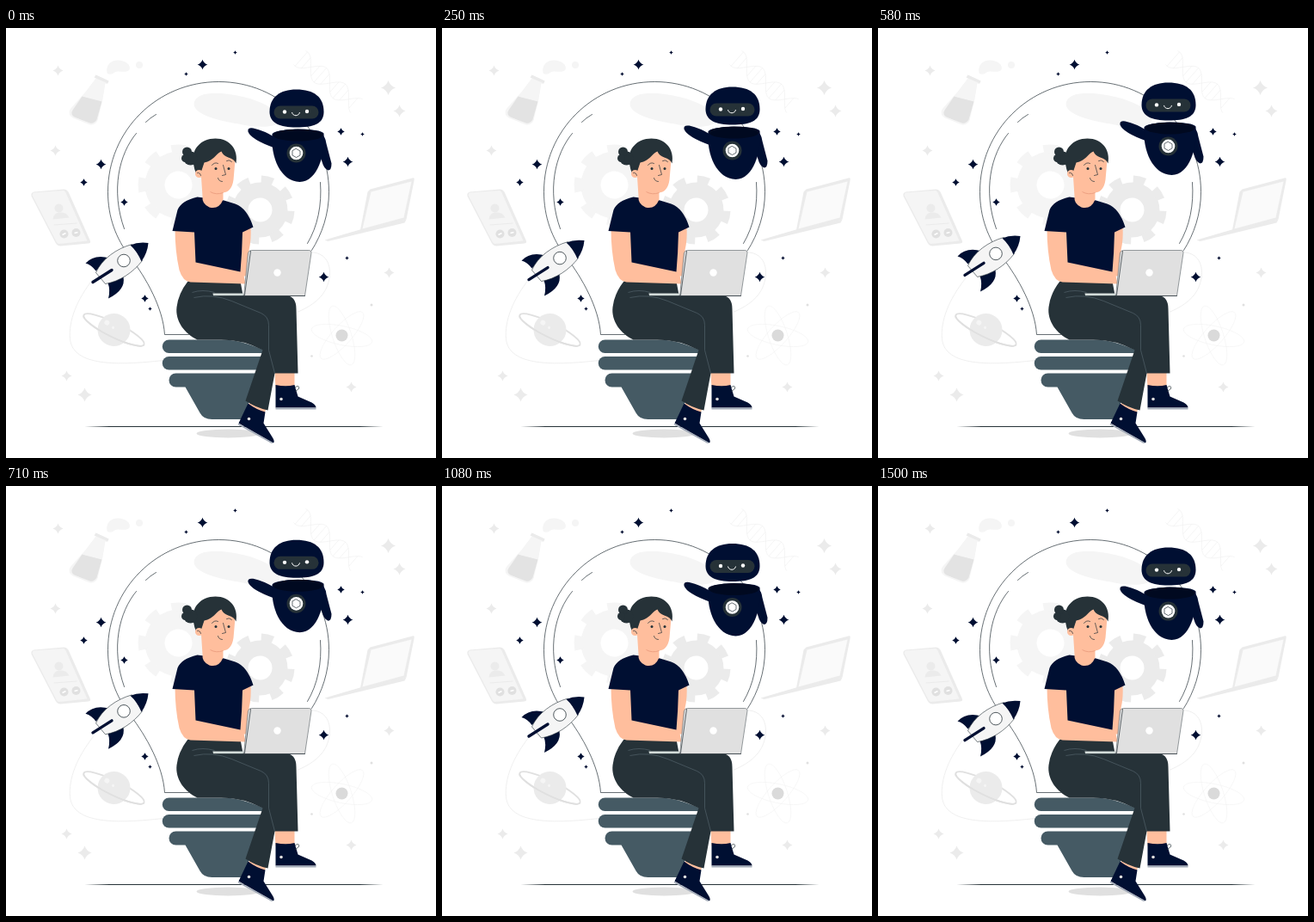
Animation, 500 px wide and 500 px high, one loop 1540 ms. Source, as an HTML page:

```html
<!DOCTYPE html>
<html lang="en">
<head>
<meta charset="utf-8">
<title>Big idea</title>
<style>
  html, body { margin: 0; width: 100%; height: 100%; overflow: hidden; background: #fff; }
  svg { display: block; width: 100vw; height: 100vh; }
  .navy { fill: #000f32; }
  .dark { fill: #263238; }
  .skin { fill: #ffbe9d; }
  .slate { fill: #455a64; }
  .g0 { fill: #fafafa; }
  .g1 { fill: #f5f5f5; }
  .g2 { fill: #ebebeb; }
  .g3 { fill: #e0e0e0; }
  .white { fill: #fff; }
  .line { fill: none; stroke: #263238; stroke-width: .7; stroke-linecap: round; }
  .faint { fill: none; stroke: #ebebeb; stroke-width: .8; }
  .ring { fill: none; stroke: #e0e0e0; stroke-width: 1.8; }
</style>
</head>
<body>
<svg viewBox="-.5 -.5 500 500">
  <g id="gears"></g>
  <g id="sparkles"></g>

  <!-- flask -->
  <path class="g1" d="M104 54 L119 61 L117 65 L115 64 L112 82 L106 107 Q103 113 97 112 L77 104 Q71 100 74 94 L91 75 L104 58Z"/>
  <path d="M88 79 L111 85 L105 106 Q102 111 97 110 L79 103 Q74 100 77 95Z" fill="#e3e3e3"/>
  <path class="g2" d="M104 54 L119 61 L118 64 L102 57Z"/>
  <path class="g1" d="M117 52 C115 41 123 36 131 37 C139 38 145 42 143 48 C138 53 131 48 126 51 Q121 55 117 52Z"/>
  <circle class="g1" cx="154.500" cy="42.500" r="4"/>

  <path id="dna" class="faint" stroke-opacity=".65"/>

  <!-- phone -->
  <path class="g2" d="M32 190 L67 187 Q70 187 72 190 L97 246 Q99 250 95 250 L63 253 Q59 253 57 249 L29 195 Q28 191 32 190Z"/>
  <path class="g1" d="M31 191 L66 188.500 Q68 188 69 191 L94 247 L61 250.500 Q59 250 58 248 L30 194Z"/>
  <g class="g2">
    <circle cx="61" cy="209" r="5"/>
    <path d="M54 222 Q55 214 62 214 Q70 213 73 220Z"/>
    <path d="M55 228 L82 226 L82.500 227 L55.500 229Z"/>
  </g>
  <g class="g3"><circle cx="67" cy="239" r="5"/><circle cx="81" cy="237.500" r="5"/></g>
  <path d="M65 240 L69 238 M79 238 L83 237" stroke="#fff" stroke-width="1.500"/>

  <!-- pale laptop -->
  <path class="g2" d="M423 187 L472 174 Q475 173 474 177 L465 222 L411 237 L420 190Z"/>
  <path class="g0" d="M424 190 L471 178 L462 220 L414 233Z"/>
  <path class="g2" d="M370 246 L411 234 L465 222 L463 226 L374 247.500Z"/>

  <!-- planet -->
  <g transform="translate(125 350.500) rotate(26)">
    <ellipse class="ring" rx="39" ry="8.500"/>
    <circle class="g2" r="19"/>
    <circle class="g1" cx="-11" cy="-4" r="3"/><circle class="g1" cx="-2" cy="-2" r="1.500"/>
    <path class="ring" d="M-39 0 A39 8.500 0 0 0 39 0"/>
  </g>

  <!-- atom -->
  <g class="faint" stroke-opacity=".45">
    <ellipse cx="390" cy="357" rx="36" ry="11" transform="rotate(12 390 357)"/>
    <ellipse cx="390" cy="357" rx="36" ry="11" transform="rotate(72 390 357)"/>
    <ellipse cx="390" cy="357" rx="36" ry="11" transform="rotate(132 390 357)"/>
  </g>
  <circle cx="390" cy="357" r="7" fill="#dadada"/>
  <circle class="g3" cx="424.500" cy="321.500" r="1.500"/><circle class="g3" cx="355" cy="381" r="1.300"/>

  <path class="faint" d="M101 291 C82 315 72 340 74 361 C77 393 130 392 182 386 M345 261 C378 255 381 285 371 304 C364 317 350 325 338 330"/>

  <!-- bulb -->
  <path class="g1" d="M218 87 C220 75 240 73 262 77 C295 82 317 95 318 106 C318 116 292 116 270 111 C243 107 217 99 218 87Z"/>
  <path class="line" d="M212 356 H184 C182 325 163 291 144 266 C127 244 118 219 118 190 C118 119 175 62 247 62 C318 62 375 119 375 190 C375 216 367 239 355 258"/>
  <path class="line" d="M151 122 C131 146 121 188 137 233 M162 109 Q167 104 174 100 M365 179 C367 205 362 230 350 250"/>

  <path d="M91 463 L120 462.600 H410 L438 463 L410 463.400 H120Z" fill="#263238"/>
  <ellipse class="g3" cx="258" cy="471" rx="37" ry="5"/>
  <g class="slate">
    <path d="M189 362 H250 Q270 361 299 374 V377.500 H189 A7.700 7.700 0 0 1 189 362Z"/>
    <path d="M189 381.500 H298 L294 397 H189 A7.700 7.700 0 0 1 189 381.500Z"/>
    <path d="M197 401 H293 L288 417 L275 454.500 H239 Q229 454.500 225 447 L208 417 H197 A8 8 0 0 1 197 401Z"/>
  </g>

  <!-- feet -->
  <path class="skin" d="M312 400 H335 V418 H313Z M284 430 L303 440 L299 450 L281 440Z"/>
  <path class="navy" d="M313 414.500 Q325 417 335 414.500 L339 428 L355 435 Q360 438 360 441 H313Z"/>
  <path class="navy" d="M281 436 Q290 443 301 446 L299 459 L309 475 Q313 481 310 482 L270 459Z"/>
  <path d="M313 442 H360 M269.500 460 L309 482" stroke="#a3abb8" stroke-width="1.800"/>
  <path class="line" d="M336 417 Q341 414 340 419 L336 422"/>
  <circle class="g3" cx="319.500" cy="431" r="1.800"/><circle class="g3" cx="282" cy="454" r="1.800"/>

  <!-- legs -->
  <path class="dark" d="M211 294 H272 L275 310 H324 Q337 311 337 326 L339 401 H312 L304 444 Q290 441 278 433 L298 374 Q275 362 250 362 H222 C207 355 196 340 198 324 Q200 308 211 294Z"/>
  <path d="M216 307 Q228 303 242 307 M218 313 Q240 308 262 317 L296 331 Q305 335 305 345 V374 L312 401" fill="none" stroke="#52626a" stroke-width=".7"/>

  <!-- torso and arms -->
  <path class="skin" d="M196 232 L219 235 L221 272 L275 282 L278 297 L214 295 Q205 294 201 281 Q196 259 196 232Z"/>
  <path class="skin" d="M273 233 L284 231 Q285 245 282 258 L285 264 L279 288 H271Z"/>
  <path class="navy" d="M222 196 C209 199 202 204 199 211 L193 235.500 L218.500 237 L220 272 L272 283 Q274 260 274.500 237 L287 231 Q280 209 266 204 L253 200Z"/>

  <!-- head -->
  <path class="skin" d="M226 165 L228 195 Q227 204 236 208 Q247 211 252 199 L252 191 Q262 190 264 176 L266 153 L251 139 L230 149Z"/>
  <path class="dark" d="M218 160 C213 141 226 128 243 128 C260 128 270 141 267 157 Q265 152 258 150 Q252 148 250 143 C243 146 241 154 230 156 L227 165 L223 172 Q219 167 218 160Z"/>
  <circle class="dark" cx="214" cy="151" r="8"/>
  <circle class="dark" cx="210" cy="143.500" r="5.500"/><circle class="dark" cx="208" cy="151" r="4.500"/>
  <circle class="skin" cx="224" cy="169" r="4.500"/>
  <path class="line" d="M222 168 Q225 167 226 171"/>
  <g class="dark"><circle cx="243.500" cy="163" r="1.500"/><circle cx="258.500" cy="163" r="1.500"/></g>
  <path class="line" d="M239 159 Q242 155 246 157 M256 154 Q259 152 262 155"/>
  <path class="line" d="M252 159 L255 170 L251 171 M246 174 Q247 178 251 178"/>
  <path d="M237 190 Q244 194 252 191" fill="none" stroke="#e99a7c" stroke-width=".8"/>

  <!-- laptop -->
  <path class="g3" d="M285 258 H352 Q355 258 354.500 261 L347 311 H276 L281 261 Q282 258 285 258Z" stroke="#6b7276" stroke-width=".7"/>
  <path class="line" d="M284 259 L277 310"/>
  <circle class="white" cx="315" cy="284" r="4.200"/>
  <path d="M240 308 H276 L275 311 H242 Q240 311 240 308Z" fill="#d3dcd9"/>
  <path class="line" d="M242 311 H347"/>

  <g id="floaters">
    <!-- rocket -->
    <path class="navy" d="M92 273 Q102 262 120 267 L104 282 Q99 275 92 273Z M118 296 L136 289 Q139 304 118.500 314 Q121 304 118 296Z"/>
    <path class="g1" d="M104 284 C111 268 128 256 146 251 L158 270 C147 284 132 294 115 297Z" stroke="#263238" stroke-width=".6"/>
    <path class="navy" d="M144 252 Q153 248 165 249.500 Q164 261 157 271 Q152 259 144 252Z"/>
    <circle class="white" cx="136.500" cy="270" r="7.300" stroke="#263238" stroke-width=".8"/>
    <path d="M100.500 295 L122.500 281" stroke="#000f32" stroke-width="3.400" stroke-linecap="round"/>

    <!-- robot -->
    <path class="navy" d="M281 120 Q280 115 287 116 Q300 119 311 126 L312 139 Q284 129 281 120Z"/>
    <path class="navy" d="M365 122 Q371 125 372 134 L378 157 Q378 165 374 165 Q369 163 367 155 L363 145Z"/>
    <path class="navy" d="M309 123 C311 116 365 115 369 122 C371 146 362 178 341 178.500 C319 178 307 150 309 123Z"/>
    <ellipse cx="339" cy="124" rx="29" ry="7" fill="#000920"/>
    <path class="navy" d="M337 71 C358 71 369 80 369 97 C369 111 357 115 337 115 C318 115 306 110 306 97 C306 80 318 71 337 71Z"/>
    <rect class="dark" x="311" y="90" width="52" height="15" rx="7.500"/>
    <g class="white"><circle cx="323.500" cy="97" r="2.200"/><circle cx="349.500" cy="96.500" r="2.200"/></g>
    <path d="M332 97.500 C333 102.500 340 102.500 341 97.500" fill="none" stroke="#fff" stroke-width="1"/>
    <circle class="dark" cx="337" cy="145" r="11"/>
    <circle class="white" cx="337" cy="145" r="7.800"/>
    <path class="line" d="M337 140 L341.500 142.500 V147.500 L337 150 L332.500 147.500 V142.500Z"/>
  </g>
</svg>
<script>
const byId = id => document.getElementById(id);

const sparkle = (cls, x, y, r) => {
  const q = r * 0.25;
  return `<path class="${cls}" d="M${x} ${y - r}Q${x + q} ${y - q} ${x + r} ${y}Q${x + q} ${y + q} ${x} ${y + r}` +
    `Q${x - q} ${y + q} ${x - r} ${y}Q${x - q} ${y - q} ${x} ${y - r}Z"/>`;
};
const navy = [[228, 42, 5.8], [110, 158, 5.8], [397, 155, 5.8], [369, 289, 5.8], [90, 179, 4.2], [137, 202, 4.2],
  [389, 120, 4.2], [161, 314, 4.2], [209, 53, 2.3], [266, 28, 2.3], [414, 123, 2.3], [396, 267, 2.3], [167, 326, 2.3]];
const pale = [[60, 49, 6], [57, 142, 6], [444, 69, 8.5], [457, 96, 7], [445, 284, 6], [401, 417, 6], [70, 404, 6], [91, 426, 8]];
byId('sparkles').innerHTML =
  navy.map(s => sparkle('navy', ...s)).join('') + pale.map(s => sparkle('g2', ...s)).join('');

const gear = (color, x, y, r, hole, turn) => `<g transform="translate(${x} ${y}) rotate(${turn})">
  <circle r="${r - 8}" fill="${color}"/>
  <circle r="${r - 5}" fill="none" stroke="${color}" stroke-width="10" pathLength="16" stroke-dasharray="1"/>
  <circle r="${hole}" fill="#fff"/></g>`;
byId('gears').innerHTML = gear('#f5f5f5', 200, 182, 47, 16, -11) + gear('#ebebeb', 295, 211, 40, 14, 2);

// Double helix along a slanted axis
const helix = (u, side) => {
  const s = side * 11 * Math.sin(u * Math.PI * 3 + 1.3);
  return `${(341 + 66 * u + s * 0.66).toFixed(1)} ${(34 + 56 * u - s * 0.75).toFixed(1)}`;
};
const steps = [...Array(37).keys()].map(i => i / 36);
byId('dna').setAttribute('d',
  [1, -1].map(side => 'M' + steps.map(u => helix(u, side)).join('L')).join('') +
  steps.filter((u, i) => i % 3 === 1).map(u => `M${helix(u, 1)}L${helix(u, -1)}`).join(''));

// Gentle bobbing, 37 poses per loop
const LOOP = 1540, POSES = 37, AMPLITUDE = 4.4, PEAK = 710;
const wave = t => Math.cos(2 * Math.PI * (t - PEAK) / LOOP);
const floaters = byId('floaters');
function draw(now) {
  const pose = Math.floor((now % LOOP) / LOOP * POSES + 0.1) % POSES;
  const rise = AMPLITUDE * (wave(pose * LOOP / POSES) - wave(0));
  floaters.setAttribute('transform', `translate(0 ${(-rise).toFixed(2)})`);
}
const start = performance.now();
(function tick() {
  draw(performance.now() - start);
  requestAnimationFrame(tick);
})();
</script>
</body>
</html>
```
